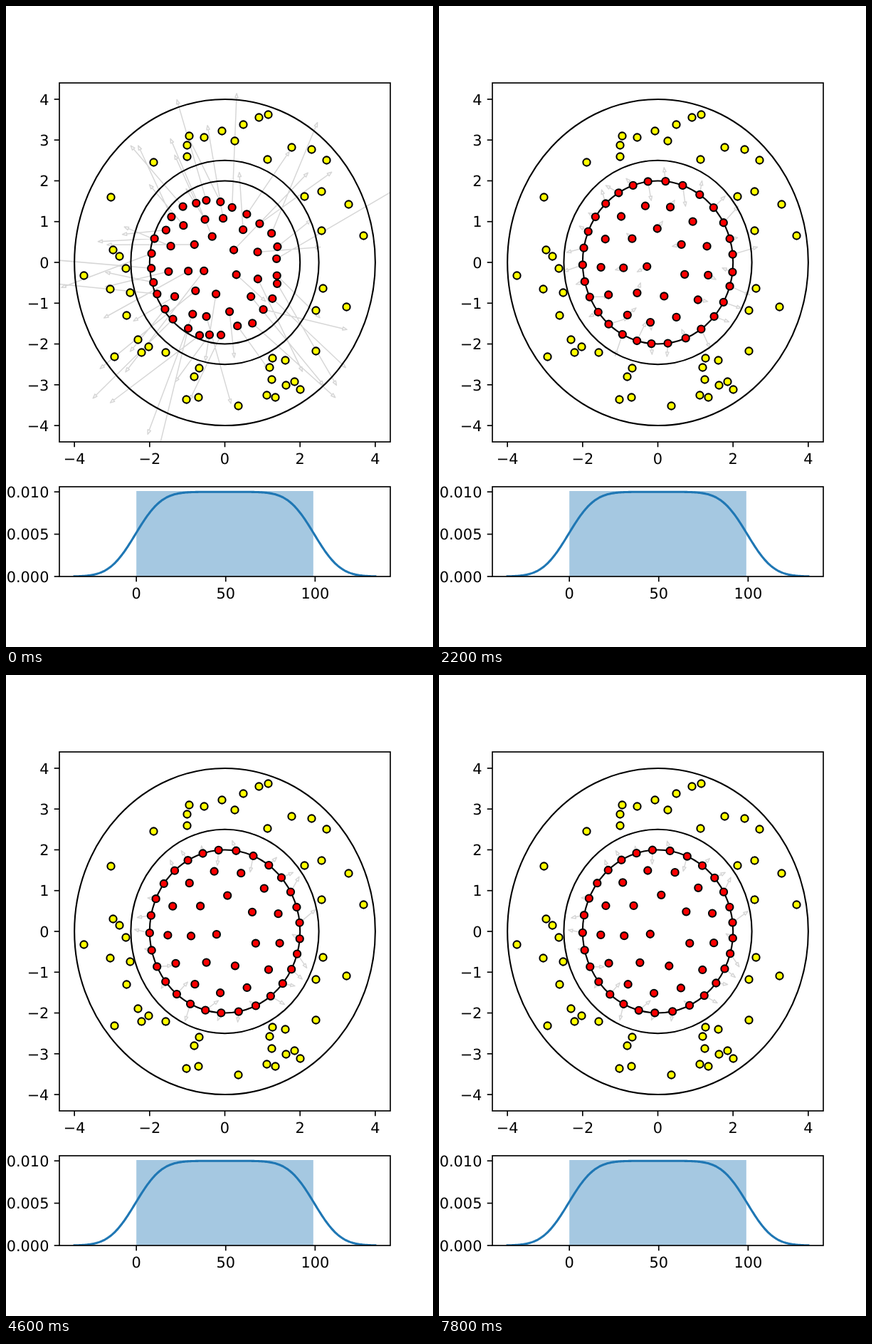
Animation, 600 px wide and 900 px high, one loop 8000 ms. Source, as an HTML page:

```html
<!DOCTYPE html>
<html lang="en">
<head>
<meta charset="utf-8">
<style>
html, body { margin: 0; width: 100%; height: 100%; overflow: hidden; background: #fff; }
svg { display: block; width: 600px; height: 900px; }
text { font: 20.83px "DejaVu Sans", sans-serif; text-rendering: geometricPrecision; }
</style>
</head>
<body>
<svg id="stage" viewBox="0 0 600 900">
  <defs>
    <clipPath id="upper"><rect x="75" y="108" width="465" height="504"/></clipPath>
    <clipPath id="lower"><rect x="75" y="675" width="465" height="126"/></clipPath>
  </defs>
</svg>
<script>
const LOOP = 8000, STEP = 200, TAU = 2 * Math.PI;
const CX = 307.5, CY = 360, SX = 52.84, SY = 57.27;

// Fixed sample between the outer circles, x y
const sample = [
  257,182, 278,184, 254,195, 254,211, 207,219, 303,175, 321,189, 333,166, 355,156, 368,152,
  367,215, 401,198, 429,201, 450,216, 443,260, 419,267, 481,278, 443,315, 502,322, 445,396,
  435,427, 478,422, 435,484, 374,494, 392,497, 370,507, 373,524, 393,532, 405,527, 413,538,
  366,546, 378,549, 326,561, 253,552, 270,549, 264,520, 271,508, 224,486, 200,478, 185,468,
  190,486, 152,492, 169,434, 174,402, 146,397, 109,378, 168,368, 159,351, 150,342, 147,268];

const svg = document.getElementById("stage");
function add(tag, attrs) {
  const el = document.createElementNS("http://www.w3.org/2000/svg", tag);
  for (const k in attrs) el.setAttribute(k, attrs[k]);
  return svg.appendChild(el);
}
function label(x, y, anchor, str) {
  add("text", { x, y: Math.round(y), "text-anchor": anchor }).textContent = str;
}
function dot(cx, cy, fill) {
  return add("circle", { cx, cy, r: 5.1, fill, stroke: "#000", "stroke-width": 2.08 });
}
function axes(x, y, w, h, xTicks, yTicks) {
  const line = { fill: "none", stroke: "#000", "stroke-width": 1.67 };
  add("rect", { x, y, width: w, height: h, ...line });
  for (const [px, str] of xTicks) {
    add("path", { d: `M${px} ${y + h}v7.3`, ...line });
    label(px, y + h + 31, "middle", str);
  }
  for (const [py, str] of yTicks) {
    add("path", { d: `M${x} ${py}h-7.3`, ...line });
    label(x - 14.6, py + 7.7, "end", str);
  }
}
const signed = v => String(v).replace("-", "\u2212");

let seed = 11;
function random() {
  seed = (seed * 1664525 + 1013904223) % 4294967296;
  return seed / 4294967296;
}

// Angles run clockwise from the top, radii are in plot units
const toXY = (r, a) => [CX + r * SX * Math.sin(a), CY - r * SY * Math.cos(a)];
function toPolar(x, y) {
  const u = (x - CX) / SX, v = (CY - y) / SY;
  return [Math.hypot(u, v), Math.atan2(u, v)];
}
const wrap = a => a - TAU * Math.round(a / TAU);

// The points settle in evenly spaced shells
const points = [];
function shell(count, r, phase, skew = 0) {
  for (let k = 0; k < count; k++) {
    const even = phase + k * TAU / count;
    const a = even + (even < Math.PI ? skew * Math.sin(2 * even) : 0);
    const [x, y] = toXY(r, a);
    // Before settling they lie further left and nearer the middle
    const dx = 15 + 15 * Math.tanh((x - 290) / 40) + 8 * (random() - 0.5);
    const dy = 0.17 * (y - CY) - 7 + 8 * (random() - 0.5);
    const [r0, a0] = toPolar(x - dx, y - dy);
    points.push({
      x, y, dx, dy, r, a, onRim: r === 2,
      gap: r - Math.min(r0, 1.96), turn: wrap(a0 - a),
      reach: 0.35 + random(), aim: 0.9 * (random() - 0.5), inward: random() < 0.3
    });
  }
}
shell(29, 2, 0.147, 0.059);
shell(13, 1.52, 0.307);
shell(7, 0.9, 0.105);
shell(1, 0.21, 4.4);

// Upper plot
const arrows = add("path", {
  fill: "none", stroke: "#000", "stroke-opacity": 0.16, "stroke-width": 1.5,
  "stroke-linejoin": "round", "clip-path": "url(#upper)"
});
for (const r of [4, 2.5, 2])
  add("ellipse", { cx: CX, cy: CY, rx: r * SX, ry: r * SY, fill: "none", stroke: "#000", "stroke-width": 2.08 });
for (let i = 0; i < sample.length; i += 2) dot(sample[i] + 0.5, sample[i + 1] + 0.5, "#ff0");
for (const p of points) p.el = dot(p.x, p.y, "#f00");
axes(75, 108, 465, 504,
  [-4, -2, 0, 2, 4].map(v => [CX + v * SX, signed(v)]),
  [-4, -3, -2, -1, 0, 1, 2, 3, 4].map(v => [CY - v * SY, signed(v)]));

// Lower plot: histogram of 0..99 and its normal kernel density
const H = 11.55, REACH = 49.5 + 3 * H;
const px = v => CX + (v - 49.5) * 211.36 / REACH;
const py = v => 801 - 11880 * v;
const cdf = z => 1 / (1 + Math.exp(-1.5976 * z - 0.07056 * z ** 3));
add("rect", { x: px(0), y: 681, width: px(99) - px(0), height: 120, fill: "#a5c8e1" });
const curve = [];
for (let k = 0; k <= 300; k++) {
  const v = 49.5 + REACH * (k / 150 - 1);
  const density = (cdf((v + 0.5) / H) - cdf((v - 99.5) / H)) / 100;
  curve.push(`${px(v).toFixed(2)} ${py(density).toFixed(2)}`);
}
add("path", {
  d: "M" + curve.join("L"), fill: "none", stroke: "#1f77b4", "stroke-width": 3.1,
  "stroke-linecap": "square", "clip-path": "url(#lower)"
});
axes(75, 675, 465, 126,
  [0, 50, 100].map(v => [px(v), v]),
  [0, 0.005, 0.01].map(v => [py(v), v.toFixed(3)]));

// Motion
function arrow(x, y, a, len) {
  if (len < 9) return "";
  const ux = Math.sin(a), uy = -Math.cos(a);
  const at = (along, side) =>
    `${(x + along * ux - side * uy).toFixed(1)} ${(y + along * uy + side * ux).toFixed(1)}`;
  const neck = len - 6;
  return `M${at(0, 0)}L${at(neck, 0)}L${at(neck, 2.2)}L${at(len, 0)}L${at(neck, -2.2)}L${at(neck, 0)}`;
}

function draw(ms) {
  const t = Math.floor((ms % LOOP) / STEP) * STEP;
  const slow = Math.exp(-t / 1600), fast = Math.exp(-t / 250);
  let d = "";
  points.forEach((p, i) => {
    const [x, y] = p.onRim
      ? toXY(p.r - p.gap * fast, p.a + p.turn * slow)
      : [p.x - p.dx * slow, p.y - p.dy * slow];
    p.el.setAttribute("cx", x.toFixed(2));
    p.el.setAttribute("cy", y.toFixed(2));
    const len = p.reach * ((p.onRim ? 20 : 4) + 30 * slow + 100 * fast);
    const flip = p.inward && t > 200 ? Math.PI : 0;
    const sway = 0.3 * Math.sin(7.3 * i + 0.004 * t);
    d += arrow(x, y, toPolar(x, y)[1] + p.aim + sway + flip, len);
  });
  arrows.setAttribute("d", d);
}

const start = performance.now();
function tick() {
  draw(performance.now() - start);
  requestAnimationFrame(tick);
}
tick();
</script>
</body>
</html>
```
